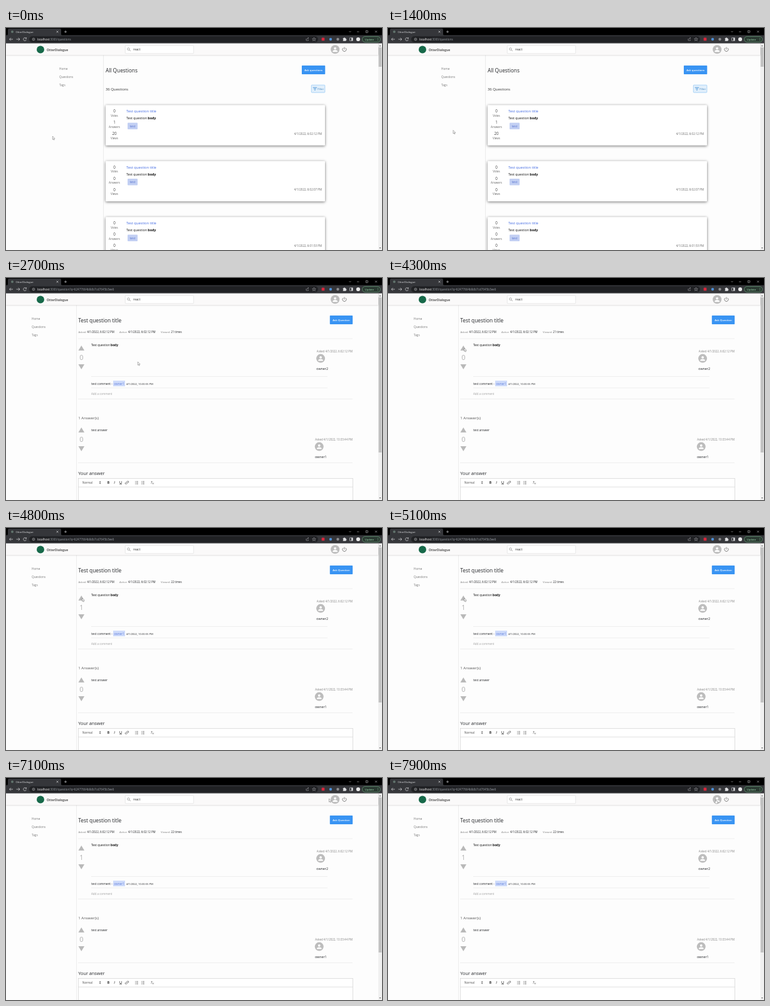
Write an HTML page that moves like this. It is 600 px wide and 355 px high and loops after 8 s.

```html
<!DOCTYPE html>
<html lang="en">
<head>
<meta charset="utf-8">
<title>Question board</title>
<style>
  html, body { margin: 0; width: 100%; height: 100%; overflow: hidden; background: #fdfdfd; }
  svg { display: block; width: 600px; height: 355px; font-family: "Open Sans", "Noto Sans", sans-serif; }
  text { white-space: pre; }
  .card { filter: drop-shadow(0 1px 2.1px rgba(0, 0, 0, .55)); }
  .header { filter: drop-shadow(0 .5px .8px rgba(0, 0, 0, .25)); }
</style>
</head>
<body>
<svg id="stage" viewBox="0 0 600 355"></svg>
<script>
const SITE = 'OtterDialogue';
const INK = '#242629', GREY = '#808080', LINE = '#e4e4e4', BLUE = '#3994f3';

const rect = (x, y, w, h, fill, more = '') =>
  `<rect x="${x}" y="${y}" width="${w}" height="${h}" fill="${fill}" ${more}/>`;
const circle = (x, y, r, fill, more = '') =>
  `<circle cx="${x}" cy="${y}" r="${r}" fill="${fill}" ${more}/>`;
const stroke = (d, color, width = .7, more = '') =>
  `<path d="${d}" fill="none" stroke="${color}" stroke-width="${width}" ${more}/>`;
const shape = (d, fill, more = '') => `<path d="${d}" fill="${fill}" ${more}/>`;
const text = (x, y, size, str, fill = INK, more = '') =>
  `<text x="${x}" y="${y}" font-size="${size}" fill="${fill}" ${more}>${str}</text>`;
const rule = (x, y, w) => rect(x, y, w, .6, LINE);
const MID = 'text-anchor="middle"', END = 'text-anchor="end"', BOLD = 'font-weight="700"';

const person = (x, y, r) => circle(x, y, r, '#bdbdbd') +
  `<g transform="translate(${x} ${y}) scale(${r / 7})">` +
  circle(0, -1.7, 1.9, '#fff') + shape('M-3.8 4V3C-3.8 .4 3.8 .4 3.8 3V4Z', '#fff') + '</g>';

function browserBar() {
  const light = '#dedfe1';
  return rect(0, 0, 600, 12, '#000') +
    shape('M1 12Q3 12 3 10V3Q3 1 5 1H86Q88 1 88 3V10Q88 12 90 12Z', '#35363a') +
    rect(0, 11.5, 600, 13, '#35363a') +
    circle(10, 6, 2, '#61736c') +
    text(15.5, 7.6, 4.3, SITE, light) +
    stroke('M80.5 4.5l3 3m0 -3l-3 3M93 6h4m-2 -2v4', light, .6) +
    stroke('M547.5 5l1.5 1.5l1.5 -1.5M560 6h3.5M589 4.3l3 3m0 -3l-3 3', light, .5) +
    rect(574.5, 4.3, 3, 3, 'none', `stroke="${light}" stroke-width=".5"`) +
    stroke('M11 18H5.5m2.3 -2.3l-2.3 2.3l2.3 2.3M16.5 18H22m-2.3 -2.3l2.3 2.3l-2.3 2.3', light) +
    stroke('M32 16.5A2.4 2.4 0 1 0 32.4 18.7M32.5 15.2v1.7h-1.7', light) +
    rect(37, 13.3, 461, 9.6, '#202124', 'rx="4.8"') +
    circle(44, 18, 1.9, 'none', `stroke="${light}" stroke-width=".5"`) +
    stroke('M44 17.6v1.5m0 -2.3v.5', light, .5) +
    stroke('M479 17v3h3.5v-1.5M480.3 18q.3 -2 2.5 -2m-1.1 -1.2l1.2 1.2l-1.2 1.2', '#b8b9bc', .5) +
    stroke('M491.5 15.2l.8 1.9l2 .1l-1.6 1.3l.6 2l-1.8 -1.1l-1.8 1.1l.6 -2l-1.6 -1.3l2 -.1Z', '#b8b9bc', .5) +
    rect(503.7, 15.5, 4.6, 4.8, '#d8273c', 'rx=".6"') +
    circle(518, 18, 2.2, '#4d8fd6') +
    circle(529.5, 18, 2.2, '#8a8b8e') +
    shape('M537.7 16.3h1.3a1 1 0 0 1 2 0h1.5v1.4a1 1 0 0 1 0 2v1h-4.8v-1.2a.9 .9 0 0 0 0 -1.7Z', light) +
    rect(548.7, 15.8, 4.5, 4.4, 'none', `stroke="${light}" stroke-width=".6"`) +
    rect(551.2, 15.8, 2, 4.4, light) +
    circle(562, 18, 3.1, '#e6e6e6') +
    rect(568.5, 13.6, 29, 9, '#2b3a32', 'rx="4.5" stroke="#81c995" stroke-width=".5"') +
    text(572.5, 19.6, 4.3, 'Update', '#9bd8ad') +
    [16.2, 18, 19.8].map(y => circle(593.3, y, .45, '#9bd8ad')).join('');
}

function header() {
  return rect(0, 24.5, 594, 18.8, '#faf9f9', 'class="header"') +
    circle(55, 34.4, 6, '#17694a') +
    text(65, 36.5, 4.8, SITE, '#555', BOLD) +
    rect(190.3, 28, 109, 12.8, '#fff', 'rx="1" stroke="#dadada" stroke-width=".6"') +
    circle(195.4, 33.6, 1.8, 'none', 'stroke="#777" stroke-width=".6"') +
    stroke('M196.8 35l2 2', '#777') +
    text(203, 36, 4.9, 'react', '#333') +
    person(525.2, 34.3, 7) +
    stroke('M538.1 31.9A3.1 3.1 0 1 0 541.9 31.9M540 30.5v3.8', '#6d6d6d', .8);
}

function scrollbar(length) {
  return rect(594, 24.5, 6, 330.5, '#f1f1f1') +
    rect(594.6, 31, 4.8, length, '#c1c1c1') +
    shape('M595.5 29.2h3l-1.5 -1.8ZM595.5 351h3l-1.5 1.8Z', '#666');
}

const sidebar = (x, edge) =>
  ['Home', 'Questions', 'Tags'].map((s, i) => text(x, 66.6 + i * 13.4, 4.7, s, '#787878')).join('') +
  rect(edge, 43.5, .6, 312, '#e2e2e2');

const askButton = (x, w, label) => rect(x, 60, w, 14, BLUE, 'rx=".8"') +
  text(x + w / 2, 68.7, 4.3, label, '#fff', MID + ' font-weight="600"');

function card(i, counts, time) {
  const names = ['Votes', 'Answers', 'Views'];
  return `<g transform="translate(0 ${i * 89.5})">` +
    rect(159, 123.3, 350, 64.5, '#fff', 'rx="1" class="card"') +
    counts.map((n, k) => text(173, 135.4 + k * 18, 6.2, n, '#444', MID) +
      text(173, 141.8 + k * 18, 4.5, names[k], '#666', MID)).join('') +
    text(192, 135.2, 5.8, 'Test question title', '#4169e1') +
    text(192, 146.3, 5.3, `Test question <tspan ${BOLD}>body</tspan>`, '#111') +
    rect(194, 151.5, 16, 10.5, '#c2cff3', 'rx="1"') +
    text(202, 158.8, 5.2, 'test', '#5874cf', MID) +
    text(504, 170.6, 4.5, `4/1/2022, ${time} PM`, '#666', END) + '</g>';
}

function listPage() {
  return sidebar(85, 155) + text(159, 70.7, 8.3, 'All Questions') +
    askButton(472, 37.3, 'Ask questions') +
    text(159, 99.8, 5.9, '36 Questions', '#333') +
    rect(487.3, 91.2, 21.6, 12, '#e1effb', 'rx="1" stroke="#80bff5" stroke-width=".6"') +
    stroke('M489.8 95.2h6.4M491 97.3h4M492.2 99.4h1.6', '#2f83d0', .8) +
    text(497.2, 98.8, 4.3, 'Filter', '#3c7fb8') +
    card(0, [0, 1, 20], '6:02:12') + card(1, [0, 0, 0], '6:02:07') + card(2, [0, 0, 0], '6:01:53') +
    scrollbar(31);
}

const voter = (y, id) => shape(`M115.5 ${y + 4}h9.6l-4.8 -8ZM115.5 ${y + 26}h9.6l-4.8 8Z`, '#b9b9b9') +
  text(120.3, y + 18.9, 11, '0', '#b0b0b0', `${MID} id="${id}"`);

const author = (x, y, name, time) =>
  text(553, y, 4.45, `Asked 4/1/2022, ${time} PM`, GREY, END) +
  person(x + 6.8, y + 9.6, 7) + text(x, y + 28, 5.3, name);

function editor() {
  const dark = '#444';
  let s = rect(115.3, 320.3, 438, 40, '#fff', 'stroke="#ccc" stroke-width=".6"') +
    rect(115.3, 333.8, 438, .6, '#ccc') + text(122, 329, 4.5, 'Normal', dark) +
    shape('M148.8 326.6h2.6l-1.3 -1.8ZM148.8 327.8h2.6l-1.3 1.8Z', dark) +
    text(163.3, 329.3, 5.6, 'B', dark, `${MID} ${BOLD}`) +
    text(173, 329.3, 5.6, 'I', dark, `${MID} font-style="italic" font-weight="600"`) +
    stroke('M181.5 325v2.2a1.5 1.5 0 0 0 3 0V325M181 329.6h4', dark) +
    stroke('M192 327l1.8 -1.8a1 1 0 0 1 1.6 1.6l-1 1M194 327.3l-1.8 1.8a1 1 0 0 1 -1.6 -1.6l1 -1', dark, .8);
  for (const x of [206, 216])
    for (const y of [325.2, 327.2, 329.2]) s += rect(x, y - .3, .9, .7, dark) + rect(x + 1.8, y - .3, 3, .6, dark);
  return s + text(230.7, 329.3, 5.3, 'T', dark, 'font-style="italic"') +
    stroke('M233.6 327.6l2 2m0 -2l-2 2', dark, .6);
}

function questionPage() {
  return sidebar(41, 112.3) + text(115.3, 70.7, 8.35, 'Test question title') +
    askButton(516.8, 36.4, 'Ask Question') +
    [[115.5, 'Asked'], [181, 'Active'], [247, 'Viewed']].map(([x, s]) => text(x, 88.3, 4.3, s, GREY)).join('') +
    [129.2, 195].map(x => text(x, 88.3, 4.45, '4/1/2022, 6:02:12 PM')).join('') +
    text(263.2, 88.3, 4.4, '21 times', INK, 'id="views"') +
    rule(115, 96.7, 438) + voter(112, 'votes') +
    text(136, 109.2, 4.8, `Test question <tspan ${BOLD}>body</tspan>`, '#111') +
    author(495.3, 119, 'owner2', '6:02:12') +
    rule(136, 157, 377) + text(136, 170.6, 4.8, 'test comment -') +
    rect(171, 164.2, 19, 9, '#cddafa') + text(180.5, 170.6, 4.7, 'owner1', '#6683dd', MID) +
    text(191.7, 170.6, 4.15, '4/1/2022, 10:30:55 PM') +
    rule(136, 175.6, 377) + text(136, 187, 4.5, 'Add a comment', '#a0a0a0') + rule(115, 193, 438) +
    text(115.3, 226, 6.1, '1 Answer(s)', '#555') +
    voter(243, 'answerVotes') + text(136, 245.4, 4.8, 'test answer') +
    author(493, 260, 'owner1', '10:33:44') + rule(115, 295, 438) +
    text(115.3, 314.7, 7.3, 'Your answer') + editor() + scrollbar(248);
}

const address = (id, path) => `<g id="${id}">` +
  text(50, 19.7, 4.6, `localhost<tspan fill="#9aa0a6">:3000${path}</tspan>`, '#fff') + '</g>';

const outline = 'stroke="#666" stroke-width=".5" stroke-linejoin="round"';
document.getElementById('stage').innerHTML =
  rect(0, 0, 600, 355, '#fdfdfd') +
  `<g id="list">${listPage()}</g><g id="question">${questionPage()}</g>` +
  header() + browserBar() +
  address('listUrl', '/questions') + address('questionUrl', '/question?q=62477664b8db7cd7645b3ee6') +
  '<g id="cursor">' +
  shape('M0 0V5.3L1.2 4.2L2 6.1L2.9 5.7L2.1 3.9H3.8Z', '#fff', outline + ' id="arrow"') +
  shape('M-.5 .4Q0 -.4 .5 .4V2.4Q2.2 2 3.2 3V4.7L2.5 6.4H-.5L-2 3.8Q-1.6 3 -.5 4Z', '#fff', outline + ' id="hand"') +
  '</g>';

// time, x, y, easing into this point
const linear = p => p, out = p => 1 - (1 - p) ** 2, smooth = p => p * p * (3 - 2 * p);
const path = [
  [0, 74.3, 173, linear], [1300, 74.3, 173, linear], [1400, 104, 163.5, linear], [2100, 210.3, 134, out],
  [3200, 210.3, 134, linear], [4000, 121.5, 112, smooth], [5600, 121.5, 112, linear],
  [6400, 474, 65, smooth], [6500, 474, 65, linear], [7100, 515.5, 33, smooth],
  [7400, 520, 33.5, out], [7900, 523, 34.5, out], [8000, 523, 34.5, linear]
];

function cursorAt(t) {
  const i = path.findIndex(p => p[0] > t);
  const [t0, x0, y0] = path[i - 1], [t1, x1, y1, ease] = path[i];
  const k = ease((t - t0) / (t1 - t0));
  return [x0 + (x1 - x0) * k, y0 + (y1 - y0) * k];
}

const el = id => document.getElementById(id);
const show = (id, on) => el(id).setAttribute('visibility', on ? 'visible' : 'hidden');

function draw(now) {
  const t = Math.floor(now % 8000 / 100) * 100;
  const opened = t >= 2700, voted = t >= 4800;
  for (const id of ['list', 'listUrl']) show(id, !opened);
  for (const id of ['question', 'questionUrl']) show(id, opened);
  el('votes').textContent = voted ? '1' : '0';
  el('views').textContent = voted ? '22 times' : '21 times';
  const [x, y] = cursorAt(t);
  el('cursor').setAttribute('transform', `translate(${x} ${y})`);
  const pointing = (t >= 2000 && !opened) || t >= 7400;
  show('hand', pointing);
  show('arrow', !pointing);
}

const start = performance.now();
function tick() {
  draw(performance.now() - start);
  requestAnimationFrame(tick);
}
tick();
</script>
</body>
</html>
```
